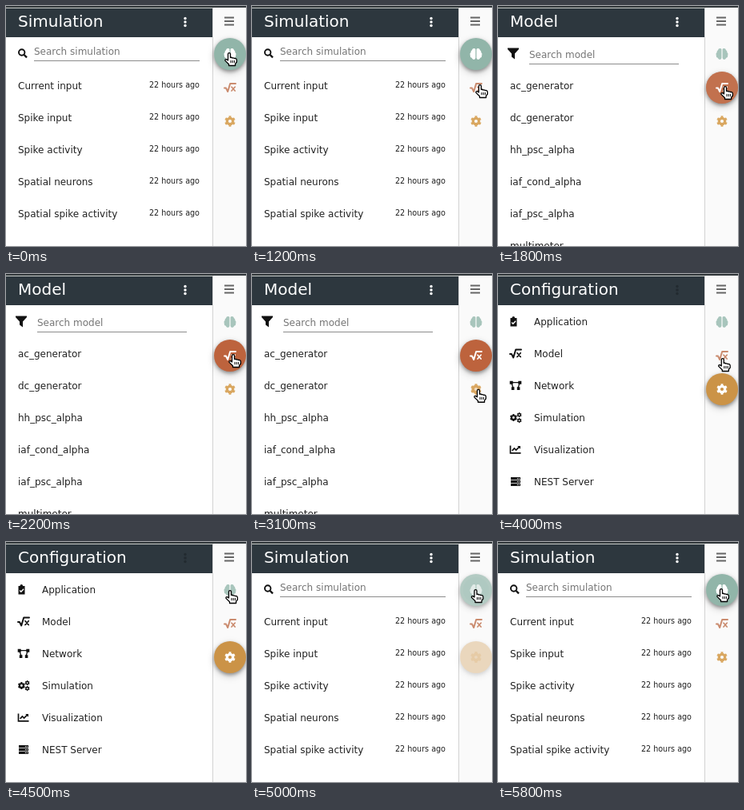
Recreate the animation shown at these times as an HTML page. Size 300 by 300 pixels, loop 6.3 s.

```html
<!DOCTYPE html>
<html lang="en">
<head>
<meta charset="utf-8">
<title>Sidebar navigation</title>
<style>
  html, body { margin: 0; width: 100%; height: 100%; overflow: hidden; background: #fff; }
  svg { display: block; width: 100vw; height: 100vh; }
  text { font: 12px "DejaVu Sans", sans-serif; fill: #212121; }
  .title { font-size: 20px; fill: #fff; }
  .hint { fill: #757575; }
  .age { font-size: 9.6px; text-anchor: end; }
  .disc { filter: drop-shadow(0 2px 2px #0005) drop-shadow(0 3px 4px #0003); }
</style>
</head>
<body>
<svg viewBox="0 0 300 300">
  <defs>
    <!-- Icons are centred on 0,0 and painted in the current colour. -->
    <g id="brain" fill="currentColor">
      <path id="lobe" d="M-.6-6Q-1.2-7.4-3-7Q-4.8-6.6-5-4.8Q-6.8-4-6.3-2.2Q-8.2-.6-7.3 1.5Q-7.6 4-5.4 4.8Q-4.6 7-2.6 6.9Q-.8 6.8-.6 5Z"/>
      <use href="#lobe" transform="scale(-1 1)"/>
    </g>
    <g id="root" fill="none" stroke="currentColor" stroke-linejoin="round" stroke-linecap="round">
      <path stroke-width="2" d="M-7 .6H-5L-2.8 5L.2-5H7"/>
      <path stroke-width="1.7" d="M2-.8L6.2 4M6.2-.8L2 4"/>
    </g>
    <g id="gear" fill="none" stroke="currentColor">
      <circle r="3.7" stroke-width="3.2"/>
      <circle r="5.6" stroke-width="2.3" pathLength="12" stroke-dasharray="1 1" stroke-dashoffset="-.5"/>
    </g>
    <g id="gears">
      <use href="#gear" transform="translate(-2.6 0) scale(.68)"/>
      <use href="#gear" transform="translate(4.6 -3.4) scale(.46)"/>
      <use href="#gear" transform="translate(4.6 3.6) scale(.46)"/>
    </g>
    <g id="clipboard">
      <path fill="currentColor" d="M-6.5-4.5H-4.6Q-4.4-6.4-2.7-6.4T-.8-4.5H1.5V6H-6.5Z"/>
      <path fill="none" stroke="#fff" stroke-width="1.4" d="M-4.8 1L-3.2 2.7L.1-.8"/>
    </g>
    <g id="network" fill="currentColor">
      <path d="M-7.3-5.8h4v4h-4zM3.3-5.8h4v4h-4zM-5.2 1.8h3.6v3.8h-3.6zM1.8 1.8h3.6v3.8h-3.6z"/>
      <path fill="none" stroke="currentColor" stroke-width="1.3" d="M-4-3.8H4M-5-3L-3 3M5-3L3 3"/>
    </g>
    <g id="chart" fill="none" stroke="currentColor" stroke-width="1.7">
      <path d="M-6.5-5V4.4H6.5M-4.3 1.4L-1.6-1.6L.6.6L4.6-3.4"/>
      <path fill="currentColor" stroke="none" d="M2.2-4.6H6V-.8Z"/>
    </g>
    <g id="server">
      <path fill="currentColor" d="M-6-5.4H6v3.2H-6zM-6-1.5H6v3.2H-6zM-6 2.4H6v3.2H-6z"/>
      <path stroke="#fff" stroke-width="1" stroke-dasharray="1.2 .8" d="M1.8-3.8H5M1.8.1H5M1.8 4H5"/>
    </g>
  </defs>

  <rect width="300" height="300" fill="#fff"/>
  <rect y="2" width="258" height="37" fill="#2d373e"/>
  <g id="panels"></g>
  <rect x="258" width="42" height="300" fill="#fafafa"/>
  <path d="M258.5 2V300" stroke="#d2d2d2"/>
  <rect width="300" height="2" fill="#33393c"/>
  <path d="M0 2.5H258" stroke="#c9cdca"/>
  <path d="M273 14.5H285M273 19H285M273 23.5H285" stroke="#666" stroke-width="1.8"/>
  <g id="buttons"></g>
  <g id="cursor">
    <path fill="#fff" stroke="#000" stroke-width="1.3" stroke-linejoin="round"
      d="M4.5 10V2Q4.5.6 6 .6T7.5 2V6.5Q9 5.8 10 7Q11.5 6.4 12.5 7.6Q15 7 15.4 9.5V12L13.6 14.3V16.5H5.5V14.8L1 10.4Q.6 8.4 2.5 8.6Z"/>
    <path stroke="#000" d="M8 10V13.2M10.2 10V13.2M12.4 10V13.2"/>
  </g>
</svg>
<script>
const LOOP = 6300, STEP = 100;
const $ = id => document.getElementById(id);
const clamp = v => Math.max(0, Math.min(1, v));

const text = (x, y, content, kind = '') => `<text class="${kind}" x="${x}" y="${y}">${content}</text>`;
const icon = (id, x, y, color = '#111') => `<use href="#${id}" x="${x}" y="${y}" color="${color}"/>`;
const dots = color => [15.5, 20, 24.5].map(y => `<circle cx="224" cy="${y}" r="1.7" fill="${color}"/>`).join('');
const rows = (items, draw) => items.map((item, i) => draw(item, i * 40)).join('');

const simulations = ['Current input', 'Spike input', 'Spike activity', 'Spatial neurons', 'Spatial spike activity'];
const models = ['ac_generator', 'dc_generator', 'hh_psc_alpha', 'iaf_cond_alpha', 'iaf_psc_alpha', 'multimeter'];
const settings = [['clipboard', 'Application'], ['root', 'Model'], ['network', 'Network'],
  ['gears', 'Simulation'], ['chart', 'Visualization'], ['server', 'NEST Server']];

$('panels').innerHTML = [
  text(15, 26, 'Simulation', 'title') + dots('#fff') +
    '<path d="M22.6 61L26 64.4" stroke="#111" stroke-width="2.3"/>' +
    '<circle cx="19.7" cy="58" r="3.7" fill="none" stroke="#111" stroke-width="1.9"/>' +
    text(35, 61, 'Search simulation', 'hint') + '<path d="M35 68.5H242" stroke="#8c8c8c"/>' +
    rows(simulations, (name, y) => text(15, 104 + y, name) + text(242, 102 + y, '22 hours ago', 'age')),
  text(15, 26, 'Model', 'title') + dots('#fff') +
    '<path d="M12 52.5H26V54L21 59.5V66.5L17 63.5V59.5L12 54Z" fill="#111"/>' +
    text(39, 65, 'Search model', 'hint') + '<path d="M39 72.5H226" stroke="#8c8c8c"/>' +
    rows(models, (name, y) => text(15, 104 + y, name)),
  text(15, 26, 'Configuration', 'title') + dots('#222a30') +
    rows(settings, ([id, name], y) => icon(id, 22, 59.5 + y) + text(45, 64 + y, name))
].map(content => `<g>${content}</g>`).join('');

const buttons = [
  { id: 'brain', y: 60, color: '#91b5a9', tint: '#a8c5bc' },
  { id: 'root', y: 102, color: '#bd633d', tint: '#ca8b6e' },
  { id: 'gear', y: 144, color: '#cb9347', tint: '#d9a760' }
];
$('buttons').innerHTML = buttons.map(b => `<g transform="translate(280 ${b.y})">
  ${icon(b.id, 0, 0, b.tint)}
  <circle class="disc" r="20" fill="${b.color}"/>
  <circle fill="${b.tint}"/>
  ${icon(b.id, 0, 0, '#fff')}</g>`).join('');

// Each click selects a page, which then fades its button in.
const clicks = [{ at: -1000, page: 0 }, { at: 1500, page: 1 }, { at: 3100, page: 2 }, { at: 4800, page: 0 }];

// Cursor keys: time, x, y
const path = [[0, 273, 58], [700, 273, 58], [900, 279, 67], [1000, 279, 67], [1200, 279, 98],
  [1400, 279, 98], [1600, 278, 100], [2200, 278, 100], [2800, 277, 144], [3400, 277, 143.5],
  [3700, 275, 138], [4400, 274.5, 61], [4500, 274, 60], [4700, 274, 60], [5300, 273, 58], [LOOP, 273, 58]];

function cursorAt(t) {
  const next = path.findIndex(key => key[0] > t);
  const [t0, x0, y0] = path[next - 1], [t1, x1, y1] = path[next];
  const k = (t - t0) / (t1 - t0);
  return [x0 + (x1 - x0) * k, y0 + (y1 - y0) * k];
}

function draw(t) {
  const index = clicks.findLastIndex(click => click.at <= t);
  const { at, page } = clicks[index];
  const previous = index ? clicks[index - 1].page : page;
  const age = t - at;
  const shown = age >= 100 ? page : previous;
  const fade = clamp(age / 300);

  [...$('panels').children].forEach((panel, i) => panel.style.display = i === shown ? '' : 'none');
  [...$('buttons').children].forEach((button, i) => {
    const level = i === page ? (previous === page ? 1 : fade) : i === previous ? 1 - fade : 0;
    const [idle, disc, ripple, active] = button.children;
    idle.style.opacity = 1 - level;
    disc.style.opacity = active.style.opacity = level;
    ripple.setAttribute('r', 20 * clamp((age + 120) / 400));
    ripple.style.opacity = i === page ? 0.35 * clamp((600 - age) / 300) : 0;
  });
  $('cursor').setAttribute('transform', `translate(${cursorAt(t)})`);
}

const start = performance.now();
function tick() {
  const t = (performance.now() - start) % LOOP;
  draw(Math.floor(t / STEP) * STEP);
  requestAnimationFrame(tick);
}
tick();
</script>
</body>
</html>
```
